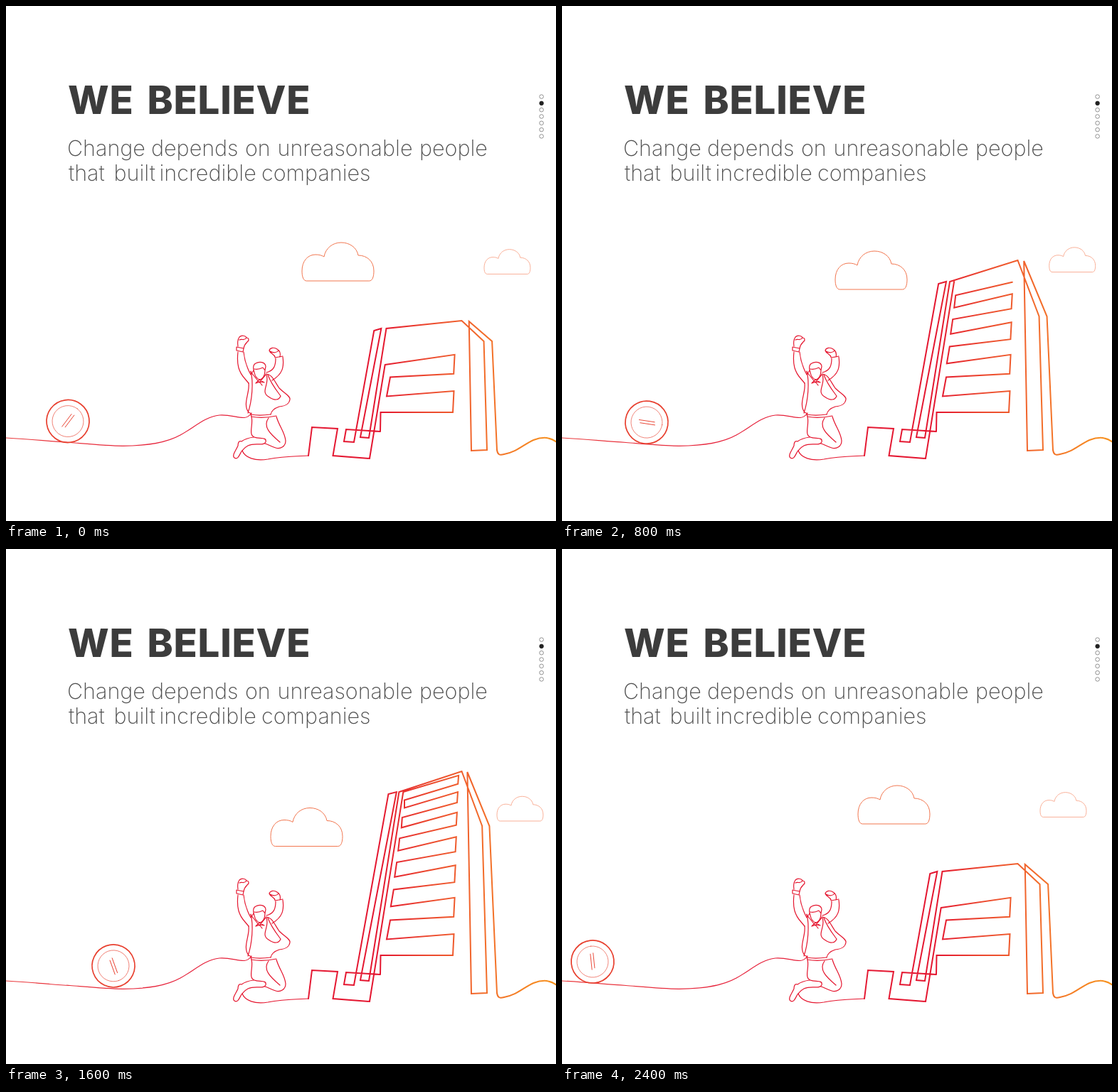
Animation, 773 px wide and 725 px high, one loop 2600 ms. Source, as an HTML page:

```html
<!DOCTYPE html>
<html lang="en">
<head>
<meta charset="utf-8">
<title>We believe</title>
<style>
  html, body { margin: 0; width: 100%; height: 100%; overflow: hidden; background: #fff; }
  svg { display: block; width: 773px; height: 725px; }
  text { font-family: Inter, Lato, sans-serif; }
  .title { font-size: 54.5px; font-weight: 800; letter-spacing: .8px; fill: #3c3c3c; }
  .sub { font-size: 30.5px; font-weight: 200; fill: #505050; }
  .line { fill: none; stroke-linecap: round; stroke-linejoin: round; }
</style>
</head>
<body>
<svg viewBox="0 0 773 725">
  <defs>
    <linearGradient id="ink" gradientUnits="userSpaceOnUse" x1="0" y1="0" x2="773" y2="0">
      <stop offset="0" stop-color="#ea3a3c"/>
      <stop offset=".3" stop-color="#e6203a"/>
      <stop offset=".68" stop-color="#e4152f"/>
      <stop offset=".77" stop-color="#ec4a2e"/>
      <stop offset=".86" stop-color="#f26a2b"/>
      <stop offset="1" stop-color="#f7931e"/>
    </linearGradient>
    <path id="cloud" d="M6 54C2 54 0 48 0 40C0 26 8 17 19 17C24 17 28 18 31 20C33 8 43 0 55 0C67 0 77 7 79 18C91 18 101 26 101 40C101 48 99 54 95 54Z"/>
  </defs>

  <text class="title" y="152.3"><tspan x="87">WE</tspan> <tspan x="198.5">BELIEVE</tspan></text>
  <text class="sub" y="211"><tspan x="86">Change</tspan> <tspan x="204">depends</tspan> <tspan x="336">on</tspan> <tspan x="381.5">unreasonable</tspan> <tspan x="581">people</tspan></text>
  <text class="sub" y="245.5"><tspan x="88">that</tspan> <tspan x="151.5">built</tspan> <tspan x="215.5">incredible</tspan> <tspan x="359">companies</tspan></text>

  <g id="dots" stroke-width=".8"></g>

  <g class="line">
    <g id="big" stroke="#f2764f" stroke-width="1"><use href="#cloud"/></g>
    <g id="small" stroke="#f8a184" stroke-width="1.3"><use href="#cloud" transform="scale(.643)"/></g>
  </g>

  <g class="line" stroke="url(#ink)">
    <path stroke-width="1.2" d="M0 608C40 610 60 613 90 614.5C120 617 145 619.5 165 619.3C200 619 225 615 245 604C265 593 280 578 300 576C315 575 325 580 335 579.5C340 579 343 576 345 573"/>
    <path id="tower" stroke-width="2" stroke-linejoin="miter"/>
    <path stroke-width="2" d="M690 625C691 631 693 633 700 631C725 627 735 606 760 608C766 609 770 611 774 614"/>
  </g>

  <g class="line" stroke="#e5162f" stroke-width="1.2">
    <!-- hands and arms -->
    <path d="M326 479C325 473 326 469 328 466C331 463 337 464 338 467C341 467 342 470 340 472C337 475 335 476 334 482M328 470C332 468 335 472 338 467"/>
    <path d="M324 480L334 482L333 487L324 485Z"/>
    <path d="M326 487C324 505 327 515 336 525L341 531M334 487C335 497 338 508 344 519L348 513"/>
    <path d="M378 494C377 490 371 489 370 485C371 481 377 480 381 483C386 486 386 490 385 494M371 486C376 489 381 488 383 485M378 495L389 493"/>
    <path d="M379 496C379 506 377 513 366 516M389 494C391 508 389 518 374 527"/>
    <!-- head and collar -->
    <path d="M349 516C347 510 347 505 351 503C356 500 364 501 365 507C365 509 364 511 364 513C364 520 361 525 357 526C353 525 350 521 349 516M349 511C353 512 359 510 361 509L364 513"/>
    <path d="M344 515L356 530L365 519M351 531L356 526L363 530L357 529L351 531M357 530L360 534"/>
    <!-- jacket -->
    <path d="M341 531C343 545 332 560 341 572L345 574M344 514C348 530 346 555 340 573"/>
    <path d="M365 518C374 518 377 528 384 538C392 546 400 549 399 554C398 560 394 563 384 564C378 566 373 570 372 575"/>
    <path d="M366 519C371 532 357 543 369 550C377 556 384 555 386 549C380 541 372 531 368 519"/>
    <!-- legs -->
    <path d="M344 575L345 578C355 580 370 579 380 577M344 575C355 577 364 576 372 575"/>
    <path d="M345 578C348 590 340 603 349 607C356 610 367 606 365 614C362 620 350 614 340 619C336 621 334 624 332 626"/>
    <path d="M380 578C384 592 392 600 393 612C393 620 386 624 379 622C372 620 368 617 364 616M369 580C360 592 372 603 385 614"/>
    <path d="M348 607C340 608 335 610 331 613C327 611 326 616 326 619C323 626 317 633 321 636C327 640 329 628 332 626C336 636 350 641 368 638C388 634 405 634 425 633"/>
  </g>

  <g id="coin" class="line" stroke="#e8402f">
    <circle r="30" stroke-width="1.7"/>
    <circle r="22" stroke-width=".6"/>
    <path stroke-width=".9" d="M-11 -2H11M-9 2H12"/>
  </g>
</svg>
<script>
const LOOP = 2600, STEP = 200, LAST = 12;
const el = id => document.getElementById(id);

// corners of the window line, floor by floor from the ground up
function windowLine(count) {
  const pts = [];
  for (let k = 0; pts.length < count; k++) {
    const right = 572 - 57 * k + 2.8 * k * k;
    const left = 549.5 - 48.5 * k + 2.3 * k * k;
    const leftX = 535 + 6 * k - 0.2 * k * k;
    pts.push(
      [628 + 1.2 * k, right],
      [629.5 + 1.1 * k, right - 30 + 3 * k],
      [leftX, left],
      [leftX + 5 - k, left - 27 + 3.2 * k]
    );
  }
  return pts.slice(0, count);
}

// front, roof, shoulder: heights of the tower's corners; the rest leans with them
function tower({ front, roof, shoulder, corners, wall = front, joined = true }) {
  const lean = (x, y, slope, top) => [x + (y - top) * slope, top];
  const wallTop = lean(512, 637, 0.157, wall);
  const windows = [[526, 599], [526.5, 572], ...windowLine(corners)];
  if (joined) windows.push(wallTop);
  const frame = [
    [526, 599], [478, 596], [475, 613], [489, 614],
    lean(489, 614, 0.18, front + 3), lean(498, 607, 0.192, front), [498, 607], [510, 608],
    lean(510, 607, 0.16, front), [640.5, roof],
    lean(676, 625, -0.029, shoulder), [676, 625], [654, 626],
    lean(654, 625, -0.018, roof + 1), lean(690, 625, -0.045, shoulder), [690, 625]
  ];
  const base = [[425, 633], [430, 593], [466, 595], [459.5, 633], [511, 637], wallTop];
  return [base, windows, frame].map(p => "M" + p.join(" ")).join("");
}

const towers = [
  tower({ front: 454, roof: 443, shoulder: 472, corners: 6, wall: 505 }),
  tower({ front: 388, roof: 358, shoulder: 437, corners: 17, joined: false }),
  tower({ front: 342, roof: 313, shoulder: 390, corners: 26 })
];

for (let i = 0; i < 7; i++) {
  const dot = document.createElementNS("http://www.w3.org/2000/svg", "circle");
  const on = i === 1;
  const attrs = { cx: 752.6, cy: 127.6 + i * 9.3, r: 2.8, fill: on ? "#222" : "none", stroke: on ? "#222" : "#777" };
  for (const k in attrs) dot.setAttribute(k, attrs[k]);
  el("dots").append(dot);
}

const place = (id, x, y, turn = 0) =>
  el(id).setAttribute("transform", `translate(${x} ${y}) rotate(${turn})`);

function draw(step) {
  const n = step % LAST;

  // the coin rolls 8px a step down a shallow dip and enters afresh on the last step
  const fresh = step === LAST;
  const roll = fresh ? -5.5 : n;
  place("coin", 87 + 8 * roll, 587 - 0.025 * (10 - roll) ** 2, fresh ? -96 : -53 + 15.4 * n);

  place("big", Math.max(372, 416 - 8 * n), 333 + 2.07 * n + 0.233 * n * n);
  place("small", 672 + 18 * Math.sin(Math.PI * n / 16), 339.5 + 0.35 * (n - 3) ** 2);
  el("tower").setAttribute("d", towers[n < 2 ? 0 : n < 5 ? 1 : 2]);
}

const start = performance.now();
function tick() {
  draw(Math.floor((performance.now() - start) % LOOP / STEP));
  requestAnimationFrame(tick);
}
tick();
</script>
</body>
</html>
```
